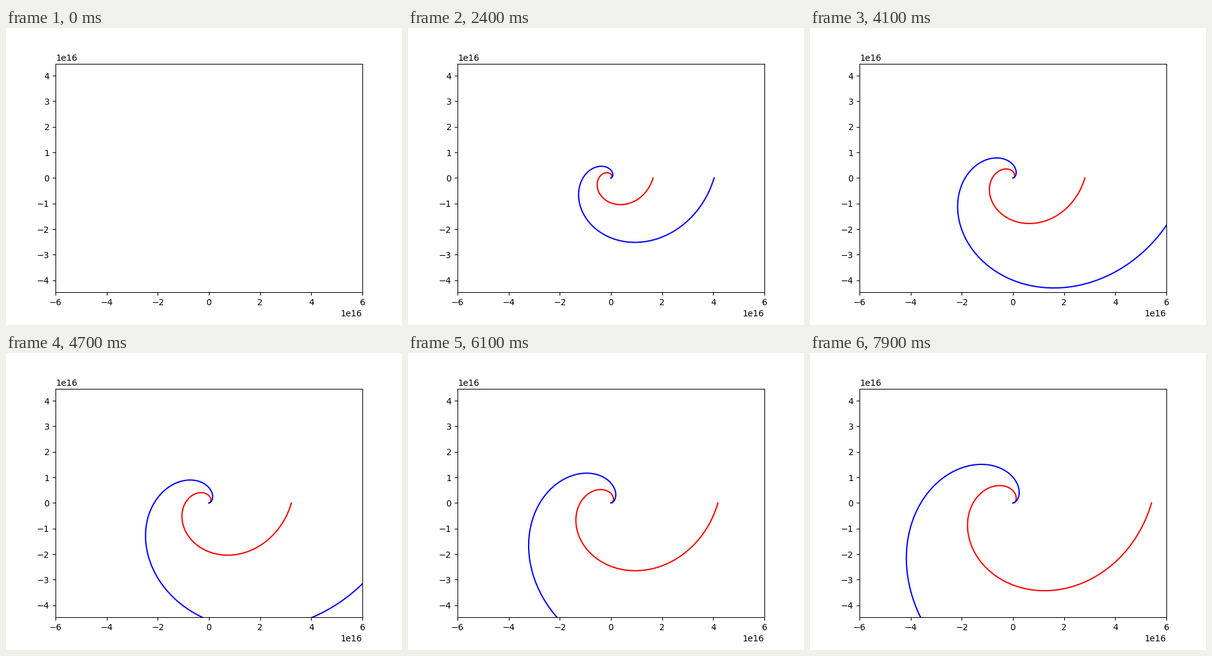
A matplotlib script for the animation above (8 s loop, 640 by 480 pixels).

```python
import numpy as np
import matplotlib.pyplot as plt
from matplotlib.animation import FuncAnimation

FRAMES = 80
INTERVAL = 100
X_MAX = 6e16

fig, ax = plt.subplots(figsize=(6.4, 4.8), dpi=100)
y_max = X_MAX * (0.77 * 480) / (0.775 * 640)  # equal scale on both axes
ax.set_xlim(-X_MAX, X_MAX)
ax.set_ylim(-y_max, y_max)

turn = np.linspace(0, 1, 500)
angle = 2 * np.pi * turn


def spiral(speed, linear, power):
    """Distance covered per frame in each direction, as x and y."""
    radius = speed * ((1 - linear) * turn**power + linear * turn)
    return radius * np.cos(angle), radius * np.sin(angle)


arms = [
    (ax.plot([], [], color="red")[0], spiral(6.858e14, 0.12, 1.952)),
    (ax.plot([], [], color="blue")[0], spiral(1.6802e15, 0.04, 1.933)),
]


def update(frame):
    for line, (x, y) in arms:
        if frame:
            line.set_data(x * frame, y * frame)
        else:
            line.set_data([], [])
    return [line for line, _ in arms]


anim = FuncAnimation(fig, update, frames=FRAMES, interval=INTERVAL,
                     repeat=True, repeat_delay=0)
plt.show()
```
